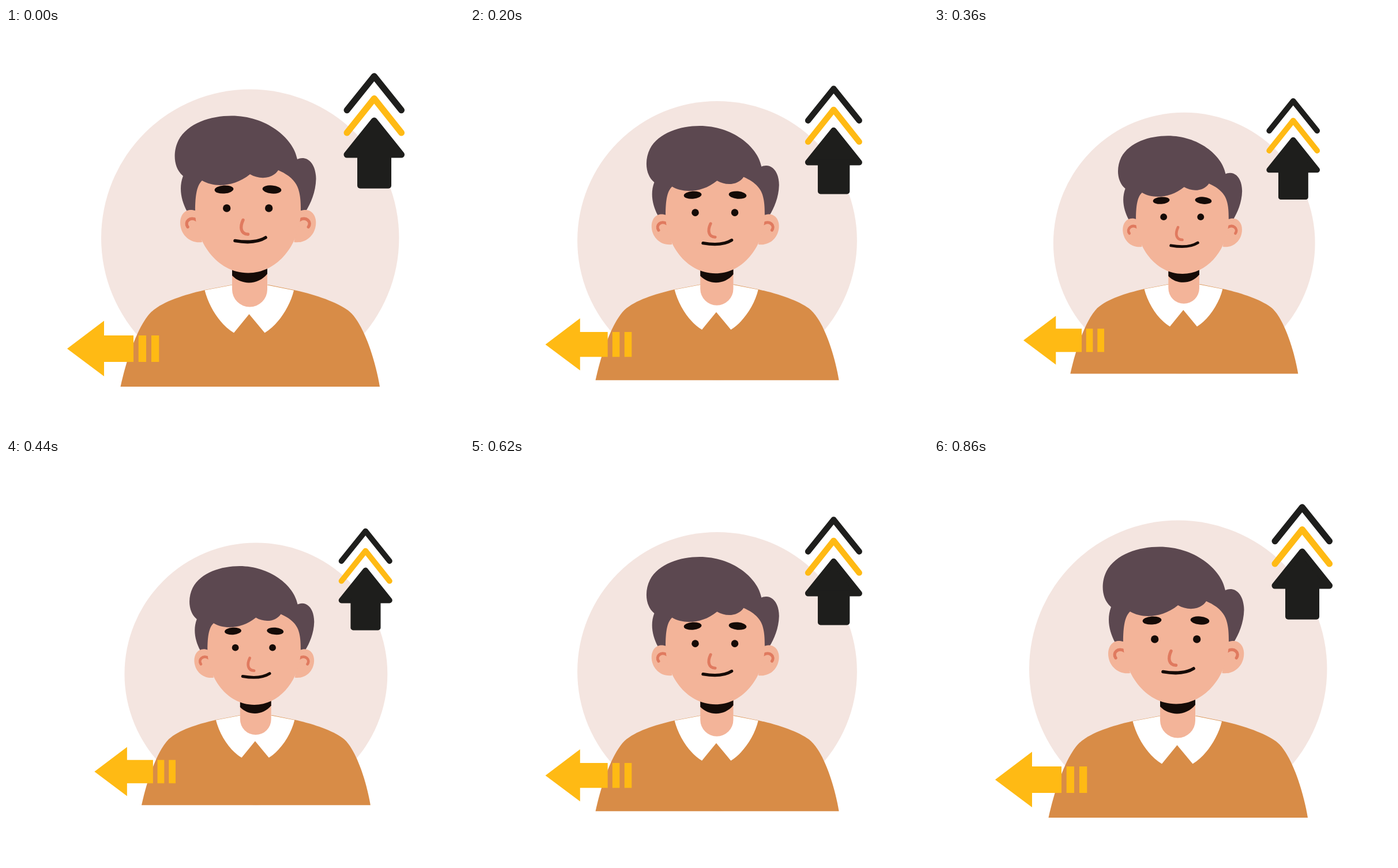
Recreate the animation shown at these times as an HTML page. Size 794x700 px, loop 3000 ms.

```html
<!DOCTYPE html>
<html lang="en">
<head>
<meta charset="utf-8">
<title>Pulsing portrait</title>
<style>
html, body { margin: 0; width: 100%; height: 100%; overflow: hidden; background: #fff; }
svg { display: block; width: 794px; height: 700px; }
.line { fill: none; stroke-linecap: round; stroke-linejoin: round; }
.skin { fill: #f3b499; }
.ink { fill: #150b07; }
.blush { stroke: #e07a5f; stroke-width: 5.4; }
.gold { fill: #ffba14; }
.bold { stroke-width: 11; }
</style>
</head>
<body>
<svg viewBox="0 0 794 700">
  <g id="scene">
    <circle cx="423.2" cy="364.8" r="258.2" fill="#f4e5e0"/>

    <!-- Sweater, collar, neck -->
    <path fill="#d88c47" d="M198.5 623C210 570 230 515 252 493C272 475 307 464 345 455L392 446H455L499 455C540 464 578 478 596 493C618 512 639 570 648 623Z"/>
    <path fill="#fff" d="M344.5 455.5L392 446.6H453L499 455.7C492 485 471 516 448.5 529.5L421.5 497L395 529.5C372 516 352 485 344.5 455.5Z"/>
    <path class="skin" d="M392 410H453V454a30.5 30.5 0 0 1-61 0Z"/>
    <path class="ink" d="M392 412V430C408 447 437 447 453 427V412Z"/>

    <!-- Head -->
    <path fill="#5c4850" d="M313.5 318C304 300 299 278 307 257C290 243 289 215 299 195C315 165 355 152.5 391 152.5C450 152.5 498 190 505 228C520 221 537 232 537.5 262C537 285 528 305 520 318Z"/>
    <g id="ear">
      <path class="skin" d="M330 318C312 311 302 324 302 338C302 358 318 375 340 372Z"/>
      <path class="line blush" d="M331 334C319 326 309 337 315 345.5"/>
    </g>
    <use href="#ear" transform="translate(839.3) scale(-1 1)"/>
    <path class="skin" d="M328 318C328 370 365 425.5 420 425.5C473 425.5 511 372 511 318C511 300 510 292 508 284C505 270 495 257 472 247C462 262 440 264 423 254C395 277 360 277 340 265C331 273 328 290 328 318Z"/>

    <!-- Features -->
    <g class="ink">
      <ellipse cx="378" cy="280.5" rx="16.4" ry="7" transform="rotate(-4 378 280.5)"/>
      <ellipse cx="461" cy="280.5" rx="16.4" ry="7" transform="rotate(5 461 280.5)"/>
      <circle cx="382.7" cy="313" r="6.7"/>
      <circle cx="455.7" cy="313" r="6.7"/>
    </g>
    <path class="line blush" d="M411 333.5C405 346 407 358 419.5 358.3"/>
    <path class="line" stroke="#150b07" stroke-width="5.6" d="M397 369.5C420 373.5 439 371 450 364"/>

    <!-- Arrows -->
    <path class="gold" d="M106 557L170 508.5V534H221V580H170V605ZM229.7 534H243V580H229.7ZM252 534H265.3V580H252Z"/>
    <path class="line bold" stroke="#1e1e1c" d="M591 142.7L638.3 83.7L685.5 142.7"/>
    <path class="line bold" stroke="#ffba14" d="M591 182L638.3 122.5L685.5 182"/>
    <g fill="#1e1e1c">
      <path class="bold" stroke="#1e1e1c" stroke-linejoin="round" d="M591 220L638.3 161L685.5 220Z"/>
      <rect x="609" y="215" width="59" height="63.7" rx="5"/>
    </g>
  </g>
</svg>
<script>
const scene = document.getElementById("scene");
const LOOP = 3000, STEP = 20, SHRINK = 0.1225;
const PIVOT = { x: 510, y: 438 };

// Smooth 0..1 ramp between two times
function ease(t, from, to) {
  const x = Math.min(1, Math.max(0, (t - from) / (to - from)));
  return x * x * (3 - 2 * x);
}

function draw(now) {
  const t = Math.floor((now % LOOP) / STEP) * STEP;
  const scale = 1 - SHRINK * (ease(t, 20, 380) - ease(t, 380, 860));
  const { x, y } = PIVOT;
  scene.setAttribute("transform", `translate(${x} ${y}) scale(${scale}) translate(${-x} ${-y})`);
  requestAnimationFrame(draw);
}

draw(performance.now());
</script>
</body>
</html>
```
